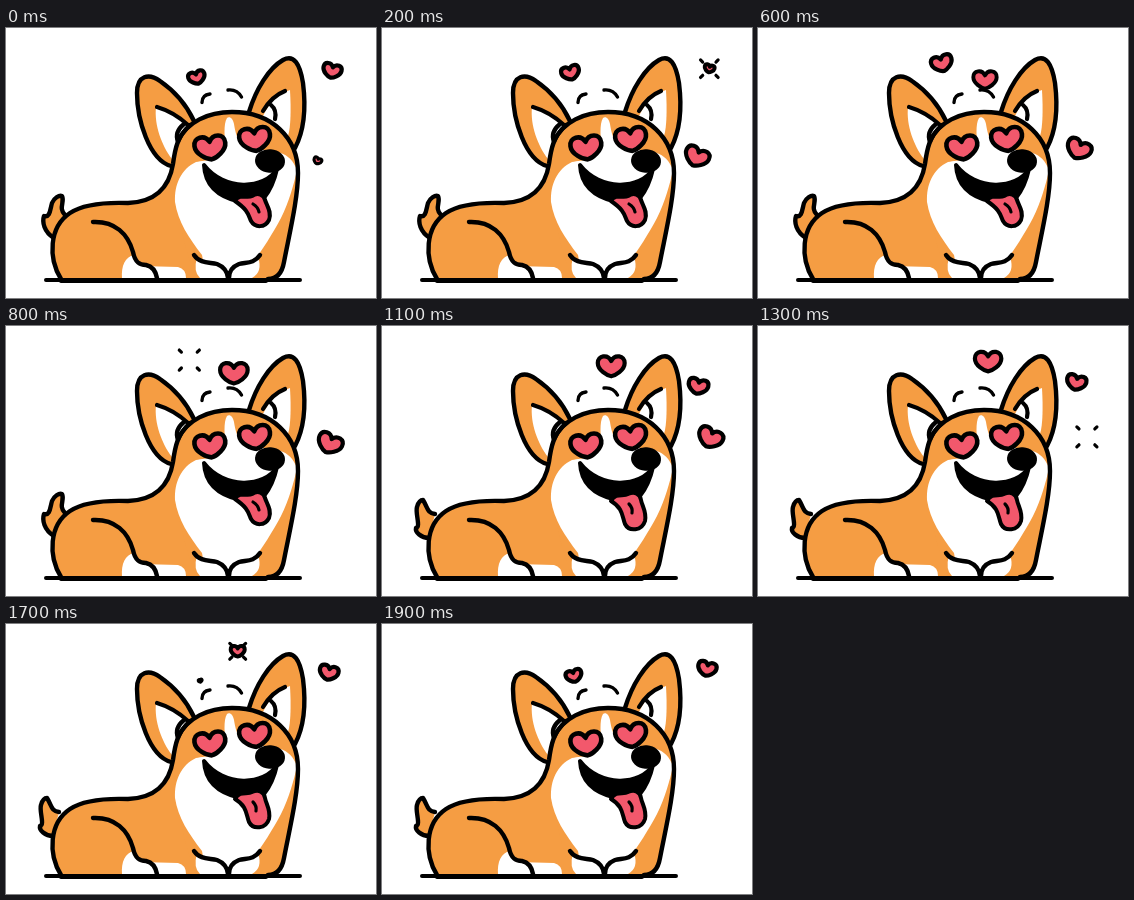
Write an HTML page with a canvas that moves like this. It is 370x270 px and loops after 2 s.

```html
<!DOCTYPE html>
<html lang="en">
<head>
<meta charset="utf-8">
<title>Happy corgi</title>
<style>
html, body { margin: 0; width: 100%; height: 100%; overflow: hidden; background: #fff; }
canvas { display: block; width: 370px; height: 270px; }
</style>
</head>
<body>
<canvas id="stage"></canvas>
<script>
const LOOP = 2000, STEP = 100;
const INK = '#000', ORANGE = '#f59d43', WHITE = '#fff', PINK = '#f2586c';
const canvas = document.getElementById('stage');
const ctx = canvas.getContext('2d');
const ratio = window.devicePixelRatio || 1;
canvas.width = 370 * ratio;
canvas.height = 270 * ratio;
ctx.scale(ratio, ratio);
ctx.lineCap = ctx.lineJoin = 'round';

const HEART = new Path2D('M0 .37C-.14 .35-.5 .15-.5-.12C-.5-.42-.13-.46 0-.2C.13-.46 .5-.42 .5-.12C.5 .15 .14 .35 0 .37Z');
const BACK = 'M184 97C171 109 169 121 167 136C163 161 148 174 122 175C95 174 76 177 64 185C43 199 42 230 55 251';
const FRONT = 'M172 113C181 94 202 84 226 84C266 84 292 110 292 145C292 170 284 203 278 234Q275 251 262 251';
const BACK_LINE = new Path2D(BACK);
const HEAD_LINE = new Path2D(FRONT);
const BODY = new Path2D(BACK + 'L262 251Q275 251 278 234L290 150Z');
const HEAD = new Path2D(FRONT + 'L190 251C172 200 162 150 172 113Z');
const FACE = new Path2D('M221 90C217 97 219 109 219 121C214 133 201 132 190 134C175 141 168 157 169 174C172 194 183 210 196 227L198 238L244 239C257 221 267 205 275 190C283 174 288 156 291 142C284 123 268 122 250 122C233 121 230 108 228 96C227 91 224 88 221 90Z');
const LEFT_EAR = new Path2D('M165 138C143 132 131 91 131 65C131 47 143 45 154 53C170 64 181 78 188 93');
const LEFT_INNER = new Path2D('M150 79Q168 84 182 97L172 113L166 131C156 118 148 97 150 79Z');
const RIGHT_EAR = new Path2D('M243 84C250 61 263 40 277 32C288 26 294 36 297 55C300 79 299 101 289 120');
const RIGHT_INNER = new Path2D('M284 62C285 80 285 98 282 108L257 88Q266 68 284 62Z');
const TAILS = [
  new Path2D('M48 210C38 204 36 194 38 188C44 190 44 182 46 175C48 170 53 167 56 168C59 174 52 180 59 187'),
  new Path2D('M47 212C39 212 33 206 34 202C39 201 33 187 35 181Q37 174 41 174C46 182 45 187 53 188')
];
const MOUTH = new Path2D('M198 137C199 160 216 170 234 174L258 170C266 160 269 150 271 141C258 162 218 163 198 137Z');
const TONGUES = [
  new Path2D('M229 173C234 165 241 171 246 168C252 164 258 167 259 172C261 178 266 184 263 192C259 200 249 200 245 193C242 186 242 182 229 173Z'),
  new Path2D('M229 175C234 166 241 171 246 168C253 165 258 168 259 174C260 180 265 186 263 195C260 205 247 206 243 198C240 190 241 182 229 175Z')
];
const BELLY = new Path2D('M116 250C115 238 119 229 128 227L134 238L172 239Q180 241 180 250Z');
const PAWS = new Path2D('M191 229Q198 236 211 235L233 235Q247 236 252 229Q257 244 246 250L194 250Q187 244 191 229Z');

// Each heart drifts from one point to another, then pops.
const hearts = [
  { born: 1650, life: 1010, at: 1900, span: 700, from: [192, 52], to: [184, 35.5], size: [16, 21], tilt: -.28 },
  { born: 450, life: 1210, at: 600, span: 900, from: [227, 52], to: [231, 31], size: [28, 26], tilt: 0 },
  { born: 910, life: 1210, at: 1100, span: 900, from: [316, 60.5], to: [326, 43], size: [20, 18.5], tilt: .25 },
  { born: 1940, life: 1220, at: 2200, span: 900, from: [314.5, 129], to: [328, 112], size: [24.5, 25], tilt: .45 }
];

const mix = (a, b, k) => a + (b - a) * k;

function shape(path, fill, width = 4.4) {
  if (fill) {
    ctx.fillStyle = fill;
    ctx.fill(path);
  }
  if (width) {
    ctx.strokeStyle = INK;
    ctx.lineWidth = width;
    ctx.stroke(path);
  }
}

function line(d, width) {
  shape(new Path2D(d), null, width);
}

function heart(x, y, size, tilt, width = 4.2) {
  const path = new Path2D();
  path.addPath(HEART, new DOMMatrix().translate(x, y).rotate(tilt * 180 / Math.PI).scale(size));
  shape(path, PINK, width);
}

function burst(x, y, age, tilt) {
  if (age < 130) heart(x, y, 18 * (1 - age / 180), tilt, 4);
  const inner = mix(7, 13, age / 200);
  for (let i = 0; i < 4; i++) {
    const a = Math.PI * (.25 + i / 2), c = Math.cos(a), s = Math.sin(a);
    line(`M${x + c * inner} ${y + s * inner}l${c * 3} ${s * 3}`, 3.2);
  }
}

function floating(h, t) {
  const age = (t - h.born + LOOP) % LOOP;
  if (age > h.life + 200) return;
  const k = (Math.min(age, h.life) + h.born - h.at) / h.span;
  const x = mix(h.from[0], h.to[0], k), y = mix(h.from[1], h.to[1], k);
  if (age > h.life) return burst(x, y, age - h.life, h.tilt);
  const grow = Math.min(1, age / 180);
  heart(x, y, mix(h.size[0], h.size[1], k) * grow, h.tilt, mix(2.5, 4.2, grow));
}

function dog(pose) {
  shape(TAILS[pose], ORANGE);
  shape(LEFT_EAR, ORANGE);
  shape(LEFT_INNER, WHITE, 0);
  shape(RIGHT_EAR, ORANGE);
  shape(RIGHT_INNER, WHITE, 0);
  line('M151 79Q168 84 182 97M178 96Q168 104 172 114', 4.2);
  line('M279 63Q266 68 257 83M265 77Q271 82 269 91', 4.2);

  shape(BODY, ORANGE, 0);
  shape(HEAD, ORANGE, 0);
  shape(FACE, WHITE, 0);
  shape(BELLY, WHITE, 0);
  shape(PAWS, WHITE, 0);
  shape(BACK_LINE);
  shape(HEAD_LINE);
  line('M87 194C109 193 122 206 127 224C129 234 133 237 140 237Q149 239 151 250', 4.4);
  line('M188 227C194 236 204 234 211 236Q221 240 222 250M254 227C248 236 240 234 233 236Q223 240 223 250', 4.4);
  line('M40 252H294M55 253H260', 4);

  shape(MOUTH, INK, 4);
  shape(TONGUES[pose], PINK, 4);
  line(pose ? 'M247 178Q251 182 250 187' : 'M247 176Q252 179 253 184', 3.2);
  ctx.fillStyle = INK;
  ctx.beginPath();
  ctx.ellipse(264, 133, 15, 11.8, .08, 0, Math.PI * 2);
  ctx.fill();
  heart(204.3, 120, 31, -.12, 4.6);
  heart(249, 111.5, 31, -.12, 4.6);
  line('M196 74.5Q196 67 204 66M222 62Q231 61 235.5 69', 3.4);
}

function draw(now) {
  const t = Math.floor(now % LOOP / STEP) * STEP;
  ctx.fillStyle = WHITE;
  ctx.fillRect(0, 0, 370, 270);
  dog(t / STEP % 2);
  for (const h of hearts) floating(h, t);
}

let start;
function tick(now) {
  start ??= now;
  draw(now - start);
  requestAnimationFrame(tick);
}
draw(0);
requestAnimationFrame(tick);
</script>
</body>
</html>
```
